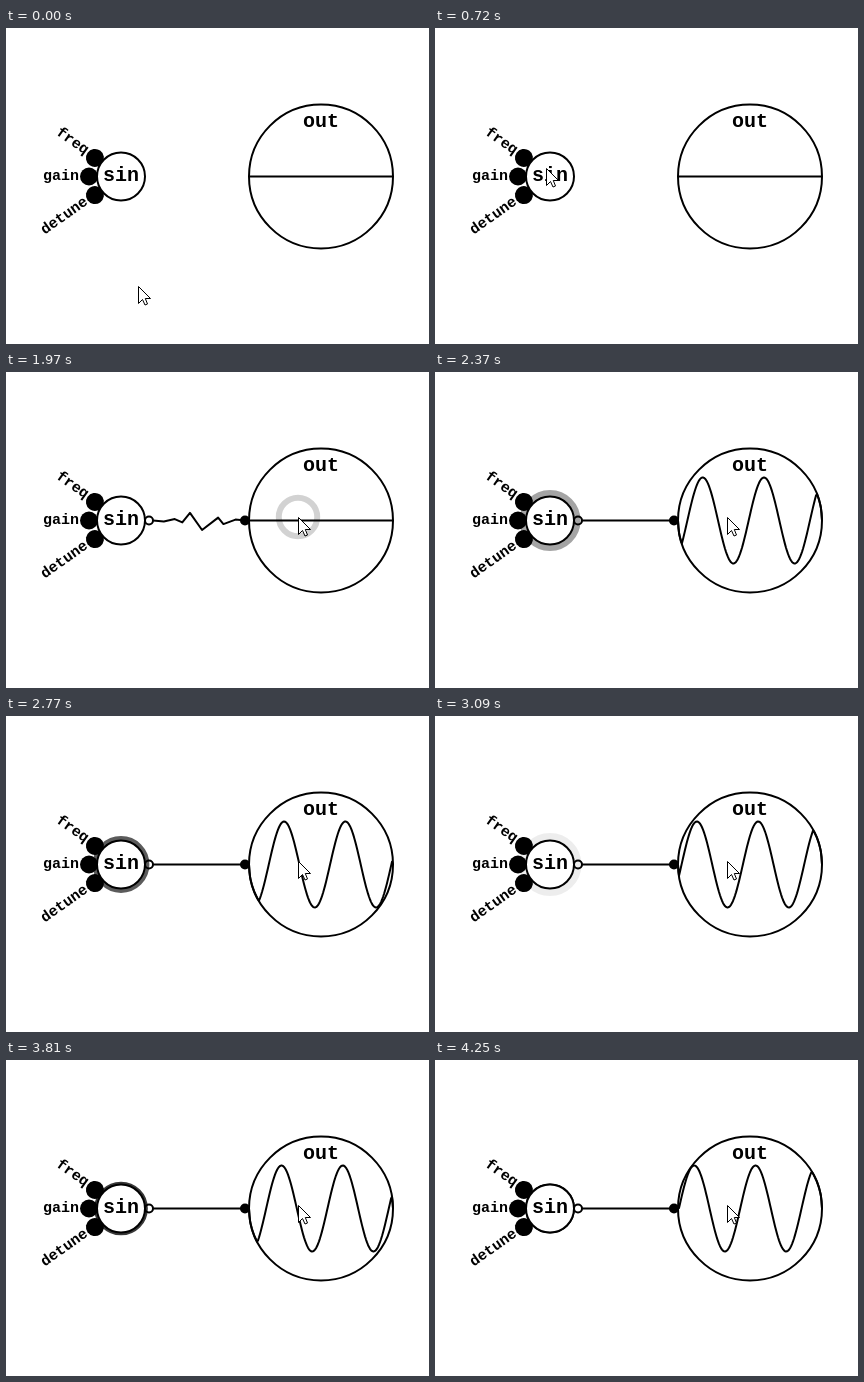
An HTML page with a canvas that plays this animation: 423 px wide and 316 px high, repeating every 4.29 s.

```html
<!DOCTYPE html>
<html lang="en">
<head>
<meta charset="utf-8">
<title>Patch a sine into the output</title>
<style>
html, body { margin: 0; width: 100%; height: 100%; overflow: hidden; background: #fff; }
canvas { display: block; }
</style>
</head>
<body>
<canvas id="stage" width="423" height="316"></canvas>
<script>
const ctx = document.getElementById('stage').getContext('2d');
const LOOP = 4290, STEP = 40, TAU = Math.PI * 2;
const MOVE = 80, HOVER = 760, PRESS = 970, DROP = 1780, ON = 2010, PULSE = 560;
const MID = 148.5, NODE = { x: 115, r: 24 }, OUT = { x: 315, r: 72 };
const PORT = 143, PLUG = 239;
const WAVE = { amp: 43, period: 61.3, crest: 307, time: 3410 };
const START = { x: 132, y: 258 }, BEND = { x: 75, y: 148 };
const GRAB = { x: 112, y: 140 }, END = { x: 292, y: 145 };
const FONT = '"Courier New", "Liberation Mono", monospace';
const ARROW = new Path2D('M.5 .5v17l4-4 2.5 5.5 2.5-1-2.2-5.5h5.2z');

const lerp = (a, b, u) => a + (b - a) * u;
const mix = (a, b, u) => ({ x: lerp(a.x, b.x, u), y: lerp(a.y, b.y, u) });
const smooth = (t, from, to) => {
  const u = Math.min(1, Math.max(0, (t - from) / (to - from)));
  return u * u * (3 - 2 * u);
};

// repeatable noise in 0..1
function noise(n) {
  const v = Math.sin(n * 12.9898) * 43758.5453;
  return v - Math.floor(v);
}

// an arc up to the node, then a straight drag to the output
function pointerAt(t) {
  if (t >= PRESS) return mix(GRAB, END, smooth(t, PRESS, DROP));
  const u = smooth(t, MOVE, HOVER);
  return mix(mix(START, BEND, u), mix(BEND, GRAB, u), u);
}

function circle(x, y, r, fill, stroke, width = 2) {
  ctx.beginPath();
  ctx.arc(x, y, r, 0, TAU);
  if (fill) { ctx.fillStyle = fill; ctx.fill(); }
  if (stroke) { ctx.strokeStyle = stroke; ctx.lineWidth = width; ctx.stroke(); }
}

function line(points) {
  ctx.beginPath();
  points.forEach(([x, y]) => ctx.lineTo(x, y));
  ctx.strokeStyle = '#000';
  ctx.lineWidth = 2;
  ctx.stroke();
}

function label(text, x, y, size, align = 'center') {
  ctx.font = `bold ${size}px ${FONT}`;
  ctx.textAlign = align;
  ctx.textBaseline = 'middle';
  ctx.fillStyle = '#000';
  ctx.fillText(text, x, y);
}

function node(x, y) {
  circle(x, y, NODE.r, '#fff', '#000');
  label('sin', x, y - 0.5, 20);
}

function inlet(text, angle) {
  ctx.save();
  ctx.translate(NODE.x, MID);
  ctx.rotate(angle);
  circle(-32, 0, 9, '#000');
  label(text, -42, -0.5, 15, 'right');
  ctx.restore();
}

// steady while dragging, pulsing once connected
function halo(t) {
  let grow = 7.5, alpha = 0.22;
  if (t >= ON) {
    const p = (t - ON) % PULSE / PULSE;
    grow *= 1 - (1 - p) ** 2;
    alpha = 1 - p;
  } else if (t < PRESS || t >= DROP) return;
  circle(NODE.x, MID, NODE.r + grow / 2, null, `rgba(0,0,0,${alpha})`, grow);
}

// crackles until the sound comes through
function cable(t) {
  if (t < DROP) return;
  const points = [], parts = 9, from = PORT + 4;
  for (let i = 0; i <= parts; i++) {
    const u = i / parts, seed = t / STEP + i * 7;
    const force = t < ON ? Math.sin(u * Math.PI) ** 2 : 0;
    const side = i % 2 ? 1 : -1;
    points.push([
      lerp(from, PLUG, u) + force * 12 * (noise(seed) - 0.5),
      MID + force * 10 * side * noise(seed + 3)
    ]);
  }
  line(points);
  circle(PLUG, MID, 5, '#000');
  circle(PORT, MID, 4, '#fff', '#000');
}

function scope(t) {
  circle(OUT.x, MID, OUT.r, '#fff', '#000');
  const steps = (t - WAVE.time) / STEP;
  const crest = WAVE.crest + steps * (steps < 0 ? 13.3 : 15.24);
  const points = [];
  for (let dx = -OUT.r; dx <= OUT.r; dx++) {
    const edge = Math.sqrt(OUT.r ** 2 - dx ** 2);
    const v = t < ON ? 0 : WAVE.amp * Math.cos((OUT.x + dx - crest) / WAVE.period * TAU);
    points.push([OUT.x + dx, MID - Math.max(-edge, Math.min(edge, v))]);
  }
  line(points);
  label('out', OUT.x, 94, 20);
}

function clickRing(t, start, at) {
  const p = (t - start) / 520;
  if (p < 0 || p >= 1) return;
  const r = 10 + 11 * (1 - (1 - p) ** 4);
  circle(at.x, at.y, r, null, `rgba(0,0,0,${0.28 * (1 - p)})`, 6);
}

function drag(t, tip) {
  if (t < PRESS || t >= DROP) return;
  const late = pointerAt(t - STEP);
  ctx.globalAlpha = 0.5;
  node(late.x + 3, late.y + 9);
  ctx.globalAlpha = 1;
  clickRing(t, PRESS, late);
  circle(late.x + 1, late.y + 1, 6, '#000');
  circle(tip.x + 1.5, tip.y + 2, 11.5, 'rgba(250,230,0,.58)');
}

function arrow({ x, y }) {
  ctx.save();
  ctx.translate(Math.round(x), Math.round(y));
  ctx.fillStyle = '#fff';
  ctx.fill(ARROW);
  ctx.strokeStyle = '#000';
  ctx.lineWidth = 1;
  ctx.stroke(ARROW);
  ctx.restore();
}

function draw(time) {
  const shift = time < PRESS ? 0 : 10;
  const t = Math.floor((time - shift) / STEP) * STEP + shift;
  const tip = pointerAt(t);
  const tilt = Math.atan2(18.5, 26);
  ctx.fillStyle = '#fff';
  ctx.fillRect(0, 0, 423, 316);
  ctx.lineJoin = 'round';
  scope(t);
  cable(t);
  halo(t);
  inlet('freq', tilt);
  inlet('gain', 0);
  inlet('detune', -tilt);
  node(NODE.x, MID);
  drag(t, tip);
  clickRing(t, DROP, tip);
  arrow(tip);
}

const begin = performance.now();
function tick() {
  draw((performance.now() - begin) % LOOP);
  requestAnimationFrame(tick);
}
tick();
</script>
</body>
</html>
```
